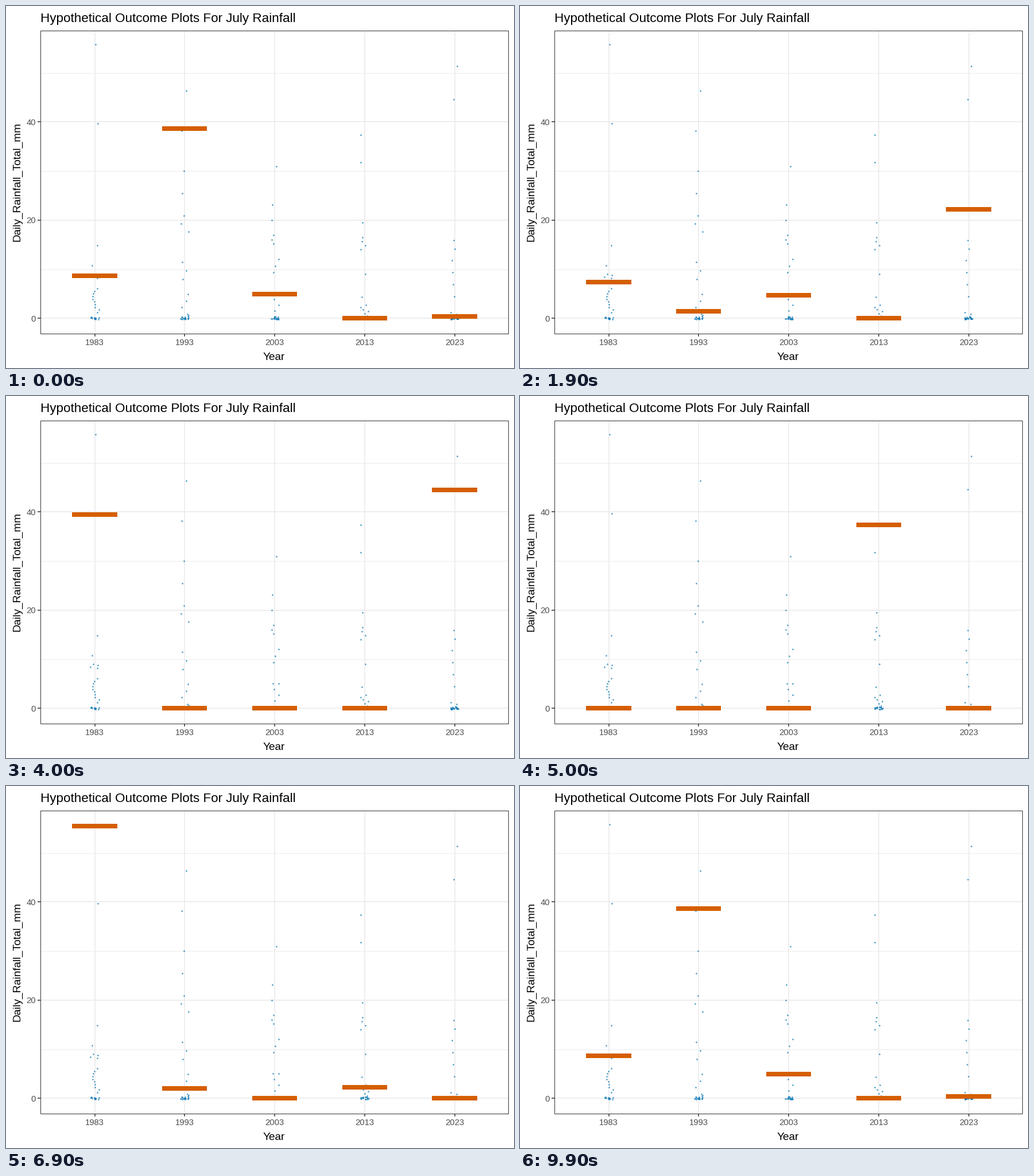
Write a matplotlib script that moves like this. It is 885x632 px and loops after 10 s.

```python
import numpy as np
import matplotlib.pyplot as plt
from matplotlib.animation import FuncAnimation
from matplotlib.patches import Rectangle

W, H, DPI = 885, 632, 64
PT = 72 / DPI                          # points per pixel
LEFT, RIGHT, TOP, BOTTOM = 60, 875, 43, 572
X0, STEP = 154.5, 156.75               # first column, column spacing
Y0, MM = 545.3, 8.575                  # zero line, pixels per mm
BAR_W, BAR_H = STEP / 2, 8
BLUE, ORANGE = "#0072B2", "#D55E00"
INK, TICK, GRID = "#333333", "#4D4D4D", "#EBEBEB"

YEARS = range(1983, 2024, 10)
DAYS, DRAWS = 31, 20

# Rain curve of each July: (rank of the day, mm), straight between the knots
CURVES = [
    [(0, 55.8), (1, 39.7), (2, 14.8), (3, 10.8), (4, 9), (7, 8.2), (8, 6.1),
     (17, 1.2)],
    [(0, 46.3), (2, 30), (4, 20.9), (6, 17.7), (7, 11.5), (9, 8), (10, 4.9),
     (13, .9), (15, .4)],
    [(0, 30.9), (1, 23.1), (3, 16.9), (5, 15.2), (6, 12), (8, 9.4), (9, 5),
     (10, 5), (14, .4)],
    [(0, 37.4), (1, 31.8), (2, 19.5), (3, 16.5), (6, 14), (7, 9), (8, 4.4),
     (9, 2.7), (14, .5)],
    [(0, 51.3), (1, 44.6), (2, 15.9), (3, 14.2), (7, 4.5), (8, 1.2),
     (10, .4)],
]

# Draws that hit a wet day, per year; every other draw is dry
WET_DRAWS = [
    {0: 8.7, 3: 8.7, 4: 6.1, 8: 39.5, 12: 4.1, 14: 55.4, 17: 8.7, 18: 8.7},
    {0: 38.6, 4: 2.9, 6: 46.4, 11: 38.6, 13: 25.6, 14: 2},
    {0: 4.9, 3: 9.4, 12: 1.3, 15: 22.8, 18: 11.9},
    {10: 37.3, 14: 2.2, 17: 2.2},
    {0: .4, 1: .4, 2: 44.5, 4: 44.5, 8: 44.5, 11: .4, 17: .2, 18: .2,
     19: 51.3},
]

plt.rcParams["font.family"] = "Liberation Sans"
fig = plt.figure(figsize=(W / DPI, H / DPI), dpi=DPI, facecolor="white")
ax = fig.add_axes([0, 0, 1, 1])
ax.set(xlim=(0, W), ylim=(H, 0))
ax.axis("off")


def col(i):
    return X0 + STEP * i


def row(mm):
    return Y0 - MM * mm


def line(xs, ys, color, width, z=1):
    ax.plot(xs, ys, color=color, lw=width * PT, zorder=z,
            solid_capstyle="butt")


def label(x, y, text, size, color="black", **kw):
    ax.text(x, y, text, fontsize=size * PT, color=color, va="baseline", **kw)


def draw_panel():
    for mm in (10, 30, 50):
        line([LEFT, RIGHT], [row(mm)] * 2, GRID, 1)
    for mm in (0, 20, 40):
        y = row(mm)
        line([LEFT, RIGHT], [y, y], GRID, 1.6)
        line([LEFT - 5, LEFT], [y, y], INK, 1.5, 5)
        label(51.7, y + 5.6, str(mm), 14.8, TICK, ha="right")
    for i, year in enumerate(YEARS):
        x = col(i)
        line([x, x], [TOP, BOTTOM], GRID, 1.6)
        line([x, x], [BOTTOM, BOTTOM + 5], INK, 1.5, 5)
        label(x, 592, str(year), 14.8, TICK, ha="center")
    ax.add_patch(Rectangle((LEFT, TOP), RIGHT - LEFT, BOTTOM - TOP, fill=False,
                           ec=INK, lw=PT, zorder=5))
    label(60, 28.3, "Hypothetical Outcome Plots For July Rainfall", 22.4)
    label(467.2, 618.3, "Year", 19, ha="center")
    label(24.3, 307, "Daily_Rainfall_Total_mm", 19, ha="center",
          rotation=90, rotation_mode="anchor")


def draw_days():
    rng = np.random.default_rng(7)
    for i, curve in enumerate(CURVES):
        rank, mm = zip(*curve)
        rain = np.interp(np.arange(DAYS), rank, mm, right=0)
        xs = col(i) + rng.uniform(-7.5, 7.5, DAYS)
        ys = row(rain) + np.where(rain > 0, 0, rng.uniform(-2.4, 1.8, DAYS))
        ax.scatter(xs, ys, s=(2.7 * PT) ** 2, c=BLUE, alpha=.7, lw=0, zorder=2)


draw_panel()
draw_days()
bars = [ax.add_patch(Rectangle((col(i) - BAR_W / 2, 0), BAR_W, BAR_H,
                               fc=ORANGE, lw=0, zorder=3))
        for i in range(len(YEARS))]


def update(frame):
    # Hold four frames, then one halfway step; the middle draw holds only three
    k, phase = divmod(frame + (frame > 52), 5)
    t = .5 if phase == 4 else 0
    for bar, wet in zip(bars, WET_DRAWS):
        now, after = (wet.get(n % DRAWS, 0) for n in (k, k + 1))
        bar.set_y(row(now + (after - now) * t) - BAR_H / 2)
    return bars


anim = FuncAnimation(fig, update, frames=100, interval=100, repeat=True,
                     repeat_delay=0)
plt.show()
```
